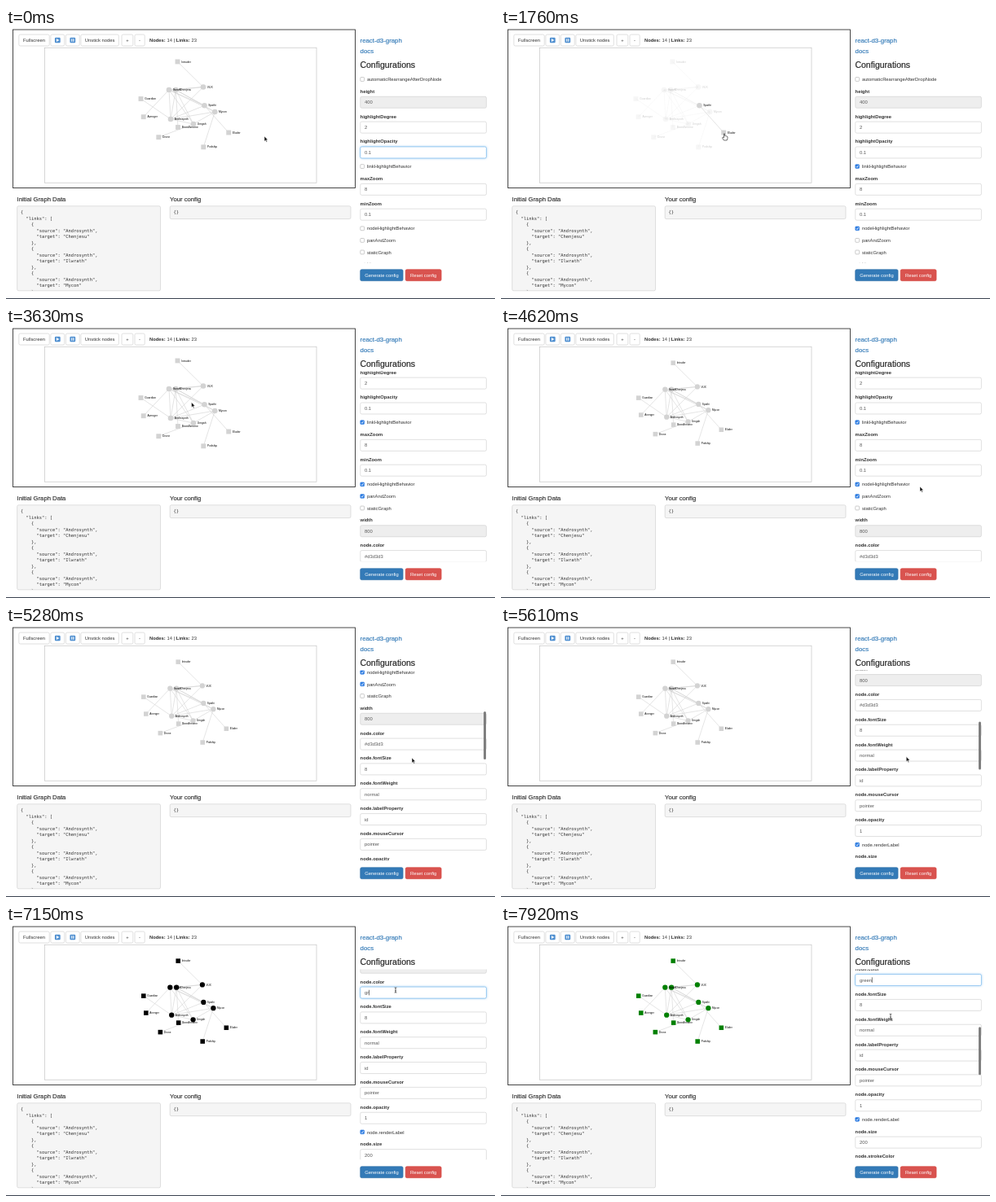
Recreate the animation shown at these times as an HTML page. Size 600 by 333 pixels, loop 8000 ms.

```html
<!DOCTYPE html>
<html lang="en">
<head>
<meta charset="utf-8">
<title>react-d3-graph playground</title>
<style>
  html, body { margin: 0; width: 100%; height: 100%; overflow: hidden; background: #fff; }
  svg { display: block; width: 600px; height: 333px; }
  text { font: 5.83px "Liberation Sans", Arial, sans-serif; fill: #333; white-space: pre; }
  .b { font-weight: bold; }
  .mono { font: 5.42px "DejaVu Sans Mono", monospace; }
  .head { stroke: currentColor; stroke-width: .18px; }
  .tag { font-size: 3.33px; fill: #000; }
  .glow { filter: drop-shadow(0 0 1.6px rgba(102, 175, 233, .6)); }
</style>
</head>
<body>
<svg id="stage" viewBox="0 0 600 333">
  <defs>
    <clipPath id="panelClip"><rect x="430" y="54.5" width="165" height="233.8"/></clipPath>
    <clipPath id="graphClip"><rect x="47.5" y="24.2" width="333.5" height="166"/></clipPath>
    <clipPath id="preClip"><rect x="14" y="219" width="175" height="103.5"/></clipPath>
  </defs>
</svg>
<script>
const LOOP = 8000, STEP = 110;
const stage = document.getElementById('stage');

function set(node, attrs) {
  for (const k in attrs) node.setAttribute(k, attrs[k]);
  return node;
}
function el(name, attrs, parent = stage, content) {
  const node = set(document.createElementNS('http://www.w3.org/2000/svg', name), attrs);
  if (content !== undefined) node.textContent = content;
  parent.appendChild(node);
  return node;
}
// Text centred vertically on cy
function label(content, x, cy, attrs = {}, parent = stage, size = 5.83) {
  return el('text', { x, y: cy + size * .35, ...attrs }, parent, content);
}
function box(x, y, width, height, fill, stroke, rx = 1.7, parent = stage) {
  return el('rect', { x, y, width, height, fill, stroke, rx, 'stroke-width': .6 }, parent);
}
function heading(content, x, cy, size, color) {
  const node = label(content, x, cy, { class: 'head' }, stage, size);
  node.style.cssText = `font-size:${size}px;fill:${color};color:${color}`;
}
function button(x, width, y, content, fill = '#fff', stroke = '#ccc', color = '#333') {
  const rect = box(x, y, width, 14, fill, stroke);
  label(content, x + width / 2, y + 7, { 'text-anchor': 'middle' }).style.fill = color;
  return rect;
}

// Linear interpolation over [time, ...values] keys
function track(keys, t) {
  if (t <= keys[0][0]) return keys[0].slice(1);
  for (let i = 1; i < keys.length; i++) {
    const a = keys[i - 1], b = keys[i];
    if (t <= b[0]) {
      const p = (t - a[0]) / (b[0] - a[0]);
      return a.slice(1).map((v, j) => v + (b[j + 1] - v) * p);
    }
  }
  return keys[keys.length - 1].slice(1);
}

// ---- Graph data ----
const nodes = {
  Androsynth: [202, 112], Chenjesu: [208.3, 76], Ilwrath: [200, 76], Mycon: [256.3, 103],
  Spathi: [243.5, 95.3], Umgah: [230, 118], VUX: [242, 72.5],
  Guardian: [165.5, 87], Broodhmome: [211, 122], Avenger: [168.7, 109.2], Podship: [242.3, 146.3],
  Eluder: [273.2, 128.5], Drone: [187.3, 134.2], Intruder: [210.5, 41.4]
};
const names = Object.keys(nodes);
const races = names.slice(0, 7), ships = names.slice(7);
const links = [];
const link = (source, target) => links.push({ source, target });
races.slice(0, 3).forEach((a, i) => races.slice(i + 1).forEach(b => link(a, b)));
link('Mycon', 'Umgah');
races.forEach((a, i) => link(a, ships[i]));

// ---- Page frame ----
box(0, 0, 600, 333, '#fff', 'none', 0);
set(box(8.5, 2, 420, 194.5, '#fff', '#333', 0), { 'stroke-width': .9 });
button(15.8, 37.4, 8, 'Fullscreen');
button(54.9, 16.8, 8, '');
button(73.4, 16.8, 8, '');
button(91.9, 46.4, 8, 'Unstick nodes');
button(142, 13.8, 8, '+');
button(158, 12.2, 8, '-');
for (const x of [59.9, 78.4]) box(x, 11.7, 6.8, 6.6, '#4f8fd0', 'none', 1.2);
el('path', { d: 'M61.9 13.1L65.4 15L61.9 16.9Z', fill: '#fff' });
el('path', { d: 'M80.2 13.2h1.1v3.6h-1.1zM82.3 13.2h1.1v3.6h-1.1z', fill: '#fff' });

const counts = label('', 176, 15);
el('tspan', { class: 'b' }, counts, 'Nodes:');
el('tspan', {}, counts, ' 14 | ');
el('tspan', { class: 'b' }, counts, 'Links:');
el('tspan', {}, counts, ' 23');

box(47.5, 24.2, 333.5, 166, '#fff', '#bbb', 0);
heading('Initial Graph Data', 13.5, 210.7, 7.7, '#333');
heading('Your config', 201, 210.7, 7.7, '#333');
box(13.7, 218.8, 175.8, 104, '#f5f5f5', '#ccc');
box(201.2, 218.8, 221.8, 15.8, '#f5f5f5', '#ccc');
label('{}', 205.6, 226.5, { class: 'mono' }, stage, 5.42);
const pre = el('g', { 'clip-path': 'url(#preClip)' });
JSON.stringify({ links }, null, 2).split('\n').slice(0, 14).forEach((line, i) =>
  label(line, 18, 226.5 + i * 7.5, { class: 'mono' }, pre, 5.42));

heading('react-d3-graph', 434.6, 15.6, 7.8, '#337ab7');
heading('docs', 434.6, 28, 7.8, '#337ab7');
heading('Configurations', 434.4, 45.8, 10.5, '#222');
const generate = button(434.7, 52.4, 296.7, 'Generate config', '#337ab7', '#2e6da4', '#fff');
button(490.2, 43.9, 296.7, 'Reset config', '#d9534f', '#d43f3a', '#fff');
box(0, 332, 600, 1, '#3a4350', 'none', 0);

// ---- Graph ----
const graph = el('g', {}, el('g', { 'clip-path': 'url(#graphClip)' }));
const lines = links.map(({ source, target }) => {
  const [x1, y1] = nodes[source], [x2, y2] = nodes[target];
  return el('line', { x1, y1, x2, y2, stroke: '#d3d3d3', 'stroke-width': .63 }, graph);
});
const marks = names.map(name => {
  const [x, y] = nodes[name];
  const g = el('g', {}, graph);
  const shape = races.includes(name)
    ? el('circle', { cx: x, cy: y, r: 3.32 }, g)
    : el('rect', { x: x - 2.95, y: y - 2.95, width: 5.9, height: 5.9 }, g);
  label(name, x + 4.8, y, { class: 'tag' }, g, 3.33);
  return { g, shape };
});

// ---- Config form; true marks a check box ----
const fields = [
  ['automaticRearrangeAfterDropNode', true], ['height', '400', 'off'], ['highlightDegree', '2'],
  ['highlightOpacity', '0.1'], ['linkHighlightBehavior', true], ['maxZoom', '8'], ['minZoom', '0.1'],
  ['nodeHighlightBehavior', true], ['panAndZoom', true], ['staticGraph', true],
  ['width', '800', 'off'], ['node.color', '#d3d3d3'], ['node.fontSize', '8'],
  ['node.fontWeight', 'normal'], ['node.labelProperty', 'id'], ['node.mouseCursor', 'pointer'],
  ['node.opacity', '1'], ['node.renderLabel', true], ['node.size', '200'], ['node.strokeColor', 'none']
];
const panel = el('g', { 'clip-path': 'url(#panelClip)' });
const form = el('g', {}, panel);
const checks = {}, inputs = {};
let y = 63.1;
for (const [name, value, off] of fields) {
  if (value === true) {
    const rect = box(434.8, y - 2.5, 4.8, 4.8, '#fff', '#aaa', .9, form);
    const tick = el('path', { d: `M435.9 ${y}l1 1.2l1.7-2.6`, fill: 'none', stroke: '#fff', 'stroke-width': .8 }, form);
    checks[name] = { rect, tick };
    label(name, 442.9, y, {}, form);
    y += 14.58;
  } else {
    label(name, 434.6, y, { class: 'b' }, form);
    const rect = box(434.8, y + 6.6, 154.6, 14, off ? '#eee' : '#fff', '#ccc', 1.7, form);
    const select = box(439.8, y + 10.2, 22.5, 7, '#b3d7fe', 'none', 0, form);
    const text = label(value, 440, y + 13.6, {}, form);
    text.style.fill = '#555';
    inputs[name] = { rect, select, text, y: y + 13.6 };
    select.setAttribute('visibility', 'hidden');
    y += 30.83;
  }
}
const caret = box(440, 0, .6, 6.6, '#222', 'none', 0, form);
const thumb = box(586, 0, 3, 59, '#7f7f7f', 'none', 1.5, panel);

// ---- Pointers ----
const pointers = {
  arrow: 'M0 0V6.3L1.5 5L2.5 7.2L3.5 6.8L2.5 4.6H4.4Z',
  hand: 'M-.6 0Q0-.7 .6 0V2.6Q1.4 2.2 1.8 2.9Q2.6 2.5 3 3.2Q4 3 4 4V5.4L3.2 8H-.6L-2.4 5.2Q-2.5 4.1-1.5 4.3L-.6 5Z',
  beam: 'M-1.3-3.2Q0-3.2 0-2.4Q0-3.2 1.3-3.2M0-2.4V2.4M-1.3 3.2Q0 3.2 0 2.4Q0 3.2 1.3 3.2M-.7 .8H.7'
};
const pointer = el('path', { 'stroke-linejoin': 'round' });
const shapes = {
  arrow: { fill: '#111', stroke: '#fff', 'stroke-width': .5 },
  hand: { fill: '#fff', stroke: '#111', 'stroke-width': .6 },
  beam: { fill: 'none', stroke: '#222', 'stroke-width': .7 }
};

// ---- Motion ----
const path = [
  [0, 317, 133], [330, 458, 167], [440, 460, 169], [770, 460, 244], [990, 460, 245],
  [1320, 340, 160], [1540, 274, 130], [1870, 274, 130], [2090, 244, 96], [2200, 270, 150],
  [2420, 470, 300], [2640, 460, 259], [2860, 461, 259], [3190, 470, 230], [3520, 232, 97],
  [3630, 227.5, 92.5], [4290, 227.5, 92.5], [4620, 514, 196], [4840, 504, 172], [5280, 498, 162],
  [5720, 497, 160], [6050, 478, 80], [7480, 478, 80], [7810, 478, 112.5]
];
const scrolls = [
  [2860, 0], [3190, 53], [4730, 53], [5280, 189.5], [5500, 230], [5830, 251.5], [7810, 251.5], [7920, 267]
];
const zooms = [[3630, 1], [3960, 1.5], [4290, .943]];
const shapeTimes = [
  [0, 'arrow'], [330, 'hand'], [1100, 'arrow'], [1540, 'hand'], [2200, 'arrow'], [2420, 'hand'],
  [2970, 'arrow'], [5940, 'beam']
];
const colorTimes = [
  [0, '#d3d3d3'], [6820, ''], [7040, 'g'], [7150, 'gr'], [7260, 'gre'], [7370, 'gree'], [7480, 'green']
];
const hovers = [[0, ''], [1540, 'Eluder'], [1980, 'Spathi'], [2200, '']];
const checkTimes = {
  linkHighlightBehavior: 440, nodeHighlightBehavior: 770, panAndZoom: 2750, 'node.renderLabel': 0
};
const latest = (list, t) => list.filter(item => item[0] <= t).pop()[1];

function focusInput(name, on) {
  set(inputs[name].rect, { stroke: on ? '#66afe9' : '#ccc', class: on ? 'glow' : '' });
}

function render(t) {
  // Graph
  const [k] = track(zooms, t);
  graph.setAttribute('transform', `translate(${223 * (1 - k)} ${89 * (1 - k)}) scale(${k})`);
  const hover = latest(hovers, t);
  const touches = l => l.source === hover || l.target === hover;
  const lit = new Set([hover]);
  links.filter(touches).forEach(l => lit.add(l.source).add(l.target));
  lines.forEach((line, i) => line.setAttribute('opacity', !hover || touches(links[i]) ? 1 : .2));
  const color = latest(colorTimes, t);
  const fill = color === 'green' || color[0] === '#' ? color : '#000';
  marks.forEach(({ g, shape }, i) => {
    g.setAttribute('opacity', !hover || lit.has(names[i]) ? 1 : .2);
    shape.setAttribute('fill', fill);
  });

  // Form
  const [scroll] = track(scrolls, t);
  form.setAttribute('transform', `translate(0 ${-scroll})`);
  const moving = [[2860, 3190], [4730, 5830], [7920, LOOP]].some(([a, b]) => t >= a && t <= b + 350);
  set(thumb, { y: 55.8 + .26 * scroll, visibility: moving ? 'visible' : 'hidden' });
  for (const name in checks) {
    const on = t >= (checkTimes[name] ?? LOOP);
    set(checks[name].rect, { fill: on ? '#2f7de1' : '#fff', stroke: on ? '#2f7de1' : '#aaa' });
    checks[name].tick.setAttribute('visibility', on ? 'visible' : 'hidden');
  }
  focusInput('highlightOpacity', t < 440);
  focusInput('node.color', t >= 6270);
  const field = inputs['node.color'];
  field.text.textContent = color;
  field.select.setAttribute('visibility', t >= 6490 && t < 6820 ? 'visible' : 'hidden');
  const end = t < 6820 || !color ? 0 : field.text.getComputedTextLength();
  set(caret, {
    x: 440 + end, y: field.y - 3.3,
    visibility: t >= 6160 && (t < 6490 || t >= 6820) ? 'visible' : 'hidden'
  });

  // Pointer
  const [px, py] = track(path, t);
  const shape = latest(shapeTimes, t);
  set(pointer, { d: pointers[shape], transform: `translate(${px} ${py})`, ...shapes[shape] });
  generate.setAttribute('fill', t === 2420 ? '#286090' : '#337ab7');
}

function tick() {
  const t = performance.now() % LOOP;
  render(Math.floor(t / STEP) * STEP);
  requestAnimationFrame(tick);
}
tick();
</script>
</body>
</html>
```
